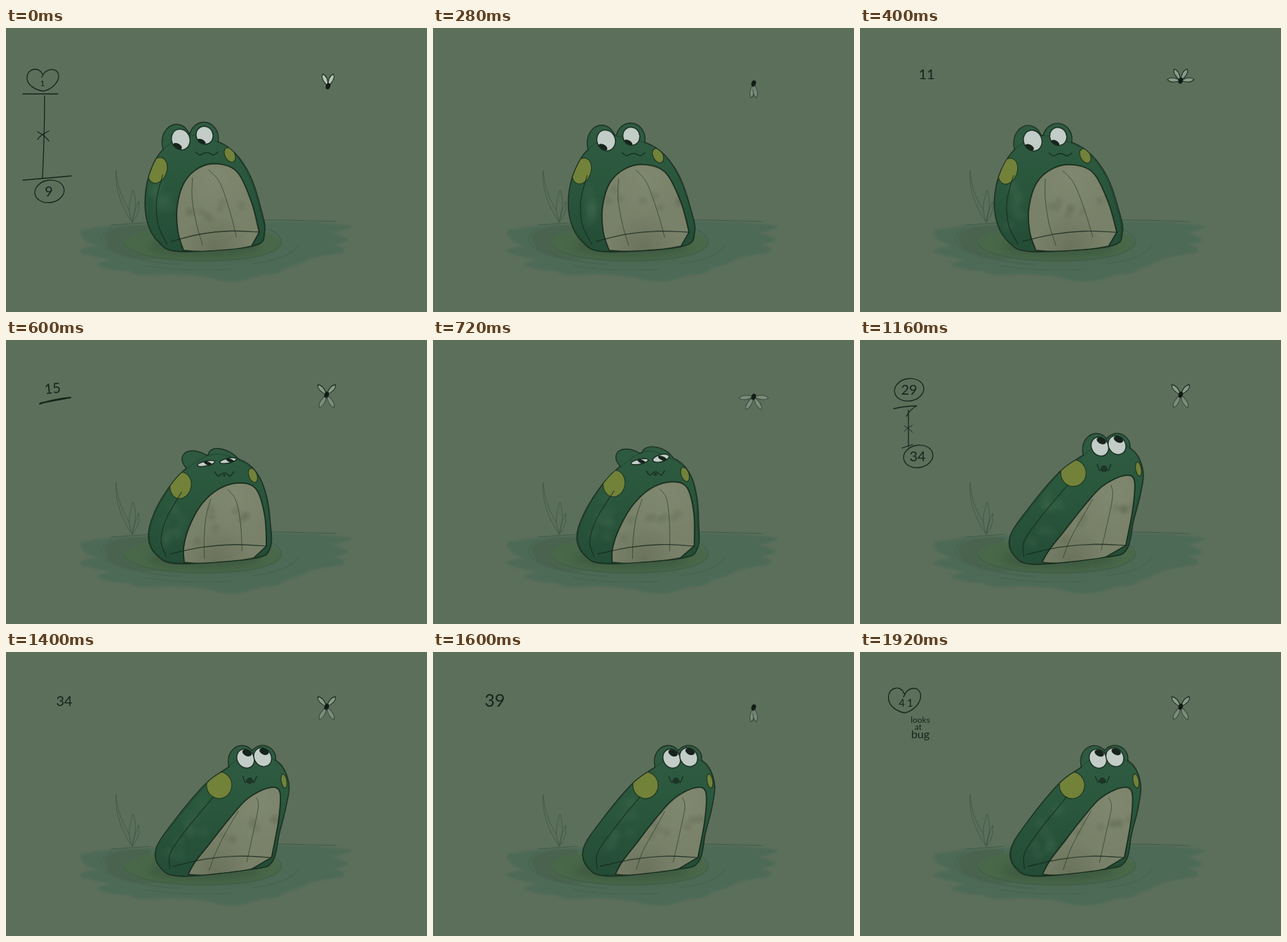
Animation of 600 by 405 pixels, one loop 1.96 s. Source, as an HTML page with a canvas:

```html
<!DOCTYPE html>
<html lang="en">
<head>
<meta charset="utf-8">
<title>Frog watching a bug</title>
<style>
  html, body { margin: 0; width: 100%; height: 100%; overflow: hidden; background: #5c6f5b; }
  svg, canvas { position: absolute; left: 0; top: 0; width: 600px; height: 405px; }
  .ink { fill: none; stroke: #17251c; stroke-width: 1.3; stroke-linecap: round; stroke-linejoin: round; }
  .ink text { fill: #17251c; stroke: none; font: 12px Lato, "Open Sans", sans-serif; text-anchor: middle; }
  .ink .num { font-size: 20px; }
  .ink g { visibility: hidden; }
  .ink g.on { visibility: visible; }
  .pencil { fill: none; stroke: #3c5746; stroke-width: .8; stroke-linecap: round; }
</style>
</head>
<body>
<svg viewBox="0 0 600 405">
  <defs>
    <filter id="soft" x="-20%" y="-20%" width="140%" height="140%"><feGaussianBlur stdDeviation="1.6"/></filter>
    <filter id="mist" x="-30%" y="-60%" width="160%" height="220%"><feGaussianBlur stdDeviation="7"/></filter>
  </defs>
  <rect width="600" height="405" fill="#5c6f5b"/>
  <g filter="url(#soft)">
    <path fill="#4e6b56" d="M106 288Q150 279 205 279L370 275Q440 274 492 282Q490 288 466 292Q482 296 489 302Q484 307 468 308Q486 313 481 320Q455 324 433 329Q420 338 398 343Q390 352 366 352Q345 360 322 362Q300 361 288 356Q240 349 203 353Q184 353 176 347Q140 345 129 338Q132 333 150 331Q112 325 104 318Q110 312 130 311Q103 303 106 288Z"/>
    <path fill="#46614d" opacity=".75" d="M139 296Q148 280 205 281L215 330Q170 332 146 316Z"/>
  </g>
  <ellipse cx="280" cy="307" rx="113" ry="26" fill="#496849" filter="url(#soft)"/>
  <ellipse cx="282" cy="312" rx="82" ry="14" fill="#354f3a" opacity=".55" filter="url(#mist)"/>
  <g class="pencil">
    <path d="M168 306C172 322 220 332 280 332S388 324 392 306Q394 296 375 287"/>
    <path opacity=".6" d="M150 285Q125 297 144 314M163 317Q182 334 250 337M352 336Q405 330 417 309M200 339Q250 348 322 344"/>
    <path d="M325 274Q390 273 470 276M150 281L206 277"/>
    <path d="M180 277C163 254 155 226 157 203C158 226 168 249 176 260M180 277C172 259 177 243 181 231C187 246 184 263 180 277C181 263 187 254 189 247C191 260 187 268 180 277"/>
  </g>
</svg>
<canvas id="art" width="600" height="405"></canvas>
<svg class="ink" viewBox="0 0 600 405">
  <defs>
    <path id="heart" d="M52 66C47 54 30 58 30 70C29 82 44 89 53 90C65 88 76 77 75 67C73 56 57 56 51 70"/>
    <path id="cross" d="M-8 -5Q2 0 8 8M8 -6Q-5 0 -8 6"/>
    <ellipse id="ring" rx="21" ry="16" transform="rotate(-10)"/>
  </defs>
  <g data-from="0" data-to="1">
    <use href="#heart"/><text x="52" y="83">1</text>
    <path d="M24 94H74M55 97Q55 150 52 214M24 217Q60 214 93 211"/>
    <use href="#cross" x="53" y="153"/>
    <use href="#ring" x="62" y="233"/><text class="num" x="61" y="240">9</text>
  </g>
  <g data-from="8" data-to="9"><text class="num" x="70" y="75">9</text></g>
  <g data-from="10" data-to="11"><text class="num" x="95" y="73" textLength="0">11</text></g>
  <g data-from="15" data-to="16">
    <text class="num" x="67" y="76" transform="rotate(-6 67 76)">15</text>
    <path stroke-width="2" d="M48 91Q70 84 92 82L49 90"/>
  </g>
  <g data-from="23" data-to="24">
    <text class="num" x="62" y="77" transform="rotate(-5 62 77)">23</text>
    <path stroke-width="2" d="M47 86L75 84"/>
    <text x="105" y="85">Overlap</text><text x="103" y="96">open</text><text x="104" y="106">eyes</text>
  </g>
  <g data-from="29" data-to="30">
    <use href="#ring" x="70" y="71"/><text class="num" x="70" y="78">29</text>
    <path d="M48 98Q64 94 81 94Q72 98 66 109M69 100L69 152M60 154L75 149"/>
    <use href="#cross" transform="translate(69 126) scale(.7)"/>
    <use href="#ring" x="83" y="166"/><text class="num" x="82" y="173">34</text>
  </g>
  <g data-from="34" data-to="35"><text class="num" x="83" y="77">34</text></g>
  <g data-from="40" data-to="41"><text class="num" x="88" y="78" style="font-size:25px">39</text></g>
  <g data-from="42" data-to="48">
    <use href="#heart" transform="translate(10 -15) scale(1.02 1.13)"/>
    <text x="67" y="78" style="font-size:15px;letter-spacing:3px">41</text>
    <text x="86" y="101">looks</text><text x="83" y="111">at</text>
    <text x="86" y="123" style="font-size:16px">bug</text>
  </g>
</svg>
<script>
const STEP = 40, LOOP = 1960, GROUND = 318, MID = 290;
const ctx = document.getElementById('art').getContext('2d');
const labels = [...document.querySelectorAll('.ink g')];
const LINE = '#14271b';

// The two extremes of the rig; every pose blends them. Ovals are x, y, rx, ry, degrees.
const sit = {
  body: [[226,172], [207,203], [199,240], [202,276], [217,304], [247,318], [350,311], [368,291], [362,255], [348,212], [327,180], [303,163], [262,152]],
  arch: [[253,317], [245,290], [244,255], [254,220], [276,199], [303,194], [330,206], [350,248], [361,291]],
  bumps: [[243,163,20,25,0], [282,157,20,22,0]],
  eyes: [[249,159,13,15,-20], [283,153,12,13,-25]],
  gaze: [-5,10],
  spots: [[216,203,13,19,20], [319,181,7,11,-28]],
  mouth: [286,179,33,2.5]
};
const reach = {
  body: [[315,166], [284,189], [240,242], [216,280], [221,306], [250,319], [350,309], [378,298], [387,258], [396,222], [400,188], [386,158], [348,144]],
  arch: [[260,317], [270,299], [290,273], [317,238], [343,209], [372,194], [388,199], [387,237], [377,293]],
  bumps: [[335,156,19,22,0], [364,152,18,18,0]],
  eyes: [[340,152,12,14,-30], [364,150,12,14,-35]],
  gaze: [2,-8],
  spots: [[303,190,18,19,0], [394,184,4,10,-10]],
  mouth: [346,182,20,5]
};
// slot, lean, widening, flattening, left lid, right lid (1 is shut)
const keys = [
  [0, 0, 0, 0, 0, 0],
  [10, 0, .07, .01, 0, 0],
  [15, .4, .05, .08, 1, 1],
  [23, 1.03, 0, 0, 1, 0],
  [29, 1.01, .02, 0, 0, 0],
  [48, .99, 0, 0, 0, 0]
];
const holds = [3, 6, 9, 18, 21, 30, 35, 41];

const mix = (a, b, t) => {
  if (typeof a === 'number') return a + (b - a) * t;
  if (Array.isArray(a)) return a.map((v, i) => mix(v, b[i], t));
  return Object.fromEntries(Object.keys(a).map(k => [k, mix(a[k], b[k], t)]));
};

function poseAt(slot) {
  let i = 0;
  while (i < keys.length - 2 && slot >= keys[i + 1][0]) i++;
  const t = (slot - keys[i][0]) / (keys[i + 1][0] - keys[i][0]);
  const [, lean, wide, flat, ...lids] = mix(keys[i], keys[i + 1], t * t * (3 - 2 * t));
  const p = mix(sit, reach, lean);
  const squash = ([x, y, ...rest]) =>
    [MID + (x - MID) * (1 + wide), GROUND + (y - GROUND) * (1 - flat), ...rest];
  for (const part of ['body', 'arch', 'bumps', 'eyes', 'spots']) p[part] = p[part].map(squash);
  p.mouth = squash(p.mouth);
  p.bumps = p.bumps.map(([x, y, rx, ry], k) =>
    [x - 4 * lids[k], y + 4 * lids[k], rx * (1 + .3 * lids[k]), ry * (1 - .35 * lids[k]), 28 * lids[k]]);
  p.pupils = p.eyes.map(([x, y], k) =>
    [x + mix(p.gaze[0], 3, lids[k]), y + mix(p.gaze[1], 0, lids[k]) + 7 * lids[k], 7, 4.5 - 2 * lids[k], 25]);
  p.eyes = p.eyes.map(([x, y, rx, ry, deg], k) =>
    [x, y + 7 * lids[k], rx, mix(ry, 3.5, lids[k]), mix(deg, -12, lids[k])]);
  p.lip = [p.mouth[0], p.mouth[1] + 2, 5 * Math.max(0, lean), 4 * Math.max(0, lean), 0];
  return p;
}

function curve(pts, closed) {
  const n = pts.length, p = new Path2D();
  const at = i => pts[closed ? (i + n) % n : Math.max(0, Math.min(n - 1, i))];
  p.moveTo(...at(0));
  for (let i = 0; i < (closed ? n : n - 1); i++) {
    const [a, b, c, d] = [at(i - 1), at(i), at(i + 1), at(i + 2)];
    p.bezierCurveTo(b[0] + (c[0] - a[0]) / 6, b[1] + (c[1] - a[1]) / 6,
      c[0] - (d[0] - b[0]) / 6, c[1] - (d[1] - b[1]) / 6, c[0], c[1]);
  }
  if (closed) p.closePath();
  return p;
}
function oval([x, y, rx, ry, deg]) {
  const p = new Path2D();
  p.ellipse(x, y, rx, ry, deg * Math.PI / 180, 0, 7);
  return p;
}
function stroke(path, width, alpha = 1) {
  ctx.globalAlpha = alpha;
  ctx.strokeStyle = LINE;
  ctx.lineWidth = width;
  ctx.stroke(path);
  ctx.globalAlpha = 1;
}
function fill(path, color) {
  ctx.fillStyle = color;
  ctx.fill(path);
}
function within(path, draw) {
  ctx.save();
  ctx.clip(path);
  draw();
  ctx.restore();
}
function glow([x, y], r, rgb, alpha) {
  const g = ctx.createRadialGradient(x, y, 0, x, y, r);
  g.addColorStop(0, `rgba(${rgb},${alpha})`);
  g.addColorStop(1, `rgba(${rgb},0)`);
  ctx.fillStyle = g;
  ctx.fillRect(x - r, y - r, 2 * r, 2 * r);
}
function seeded(seed) {
  return () => {
    seed = (seed * 16807 + 11) % 2147483647;
    return seed / 2147483647;
  };
}

function drawFrog(p, seed) {
  const rand = seeded(seed * 977 + 5);
  const wobble = (pts, k) => pts.map(q => q.map(v => v + k * (2 * rand() - 1)));
  const { body, arch } = p;
  const shape = curve(body, true), bumps = p.bumps.map(oval), skinParts = [shape, ...bumps];
  const belly = curve(arch);
  const under = mix(body[5], body[6], .5);
  belly.lineTo(...body[6]);
  belly.quadraticCurveTo(under[0], under[1] + 8, ...arch[0]);

  const skin = ctx.createLinearGradient(0, 135, 0, 320);
  skin.addColorStop(0, '#305b42');
  skin.addColorStop(.4, '#2a583d');
  skin.addColorStop(1, '#244c36');
  skinParts.forEach(s => stroke(s, 2.8, .85));
  skinParts.forEach(s => fill(s, skin));
  stroke(curve(wobble(body, 1.5), true), .8, .5);

  within(shape, () => {
    for (let i = 0; i < 9; i++)
      glow(mix(mix(body[1], body[4], rand()), arch[2], rand() * .7), 12, '66,108,80', .25);
    for (const s of p.spots.map(oval)) {
      fill(s, '#728239');
      stroke(s, 1.2, .75);
    }
    fill(belly, '#798169');
    within(belly, () => {
      glow(mix(arch[3], arch[6], .6), 60, '134,142,117', .5);
      glow(under, 50, '86,92,72', .4);
      for (let i = 0; i < 8; i++)
        glow(mix(mix(arch[1], arch[3], rand()), arch[7], rand()), 9, '92,99,78', .3);
    });
    stroke(belly, 1.7, .85);
  });
  stroke(curve(wobble(arch, 1)), .8, .5);

  const rows = [0, 1, 2, 3];
  stroke(curve(rows.map(i => mix(body[i + 1], arch[3 - i], .35))), 1.2, .75);
  for (const t of [.25, .7])
    stroke(curve(wobble(rows.map(i => mix(arch[3 - i], arch[5 + i], t)), .6)), .9, .6);
  const [ax, ay] = mix(body[4], body[5], .6);
  const rim = rows.map(i => {
    const [x, y] = mix([ax, ay - 8], arch[8], i / 3);
    return [x, y - 7 * Math.sin(i / 3 * Math.PI)];
  });
  stroke(curve(rim), 1.1, .75);
  stroke(curve(wobble(rim, 1)), .7, .5);

  p.eyes.forEach((e, i) => {
    const eye = oval(e);
    fill(eye, '#c3cdc8');
    within(eye, () => fill(oval(p.pupils[i]), '#17231d'));
    stroke(eye, 1.5, .9);
  });
  const [mx, my, width, dip] = p.mouth;
  const smile = [...Array(6).keys()].map(i => [mx + width * (i / 5 - .5), my - dip * Math.cos(i * Math.PI * .8)]);
  stroke(curve(smile), 1.3, .9);
  fill(oval(p.lip), '#1b3527');
}

// Each flap: body height, then wing angles from upright, mirrored left and right.
const flaps = [[78, 42, 150], [79, 170], [81, 148, 95], [75, 30, 85]];

function drawBug([y, ...angles], x, white) {
  for (const deg of angles) for (const side of [-1, 1]) {
    const a = deg * Math.PI / 180, up = deg < 90;
    const dx = side * Math.sin(a), dy = -Math.cos(a), len = up ? 19 : 21;
    const wing = new Path2D();
    const edge = k => [x + dx * len * .7 - dy * k, y + dy * len * .7 + dx * k];
    wing.moveTo(x, y);
    wing.quadraticCurveTo(...edge(6), x + dx * len, y + dy * len);
    wing.quadraticCurveTo(...edge(-6), x, y);
    fill(wing, `rgba(205,220,204,${up ? white : white * .7})`);
    stroke(wing, 1.1, up ? .9 : .55);
  }
  fill(oval([x, y, 3.2, 4.5, 20]), '#121c16');
}

let shown = -1;
function draw(now) {
  const slot = Math.floor(now % LOOP / STEP);
  if (slot === shown) return;
  shown = slot;
  const drawing = slot - holds.filter(h => h <= slot).length;
  ctx.clearRect(0, 0, 600, 405);
  drawFrog(poseAt(holds.includes(slot) ? slot - 1 : slot), drawing);
  if (drawing) drawBug(flaps[drawing % 4], 457, .4);
  else drawBug([83, 24], 459, .8);
  for (const g of labels)
    g.classList.toggle('on', slot >= +g.dataset.from && slot <= +g.dataset.to);
}
const start = performance.now();
function tick() {
  draw(performance.now() - start);
  requestAnimationFrame(tick);
}
tick();
</script>
</body>
</html>
```
